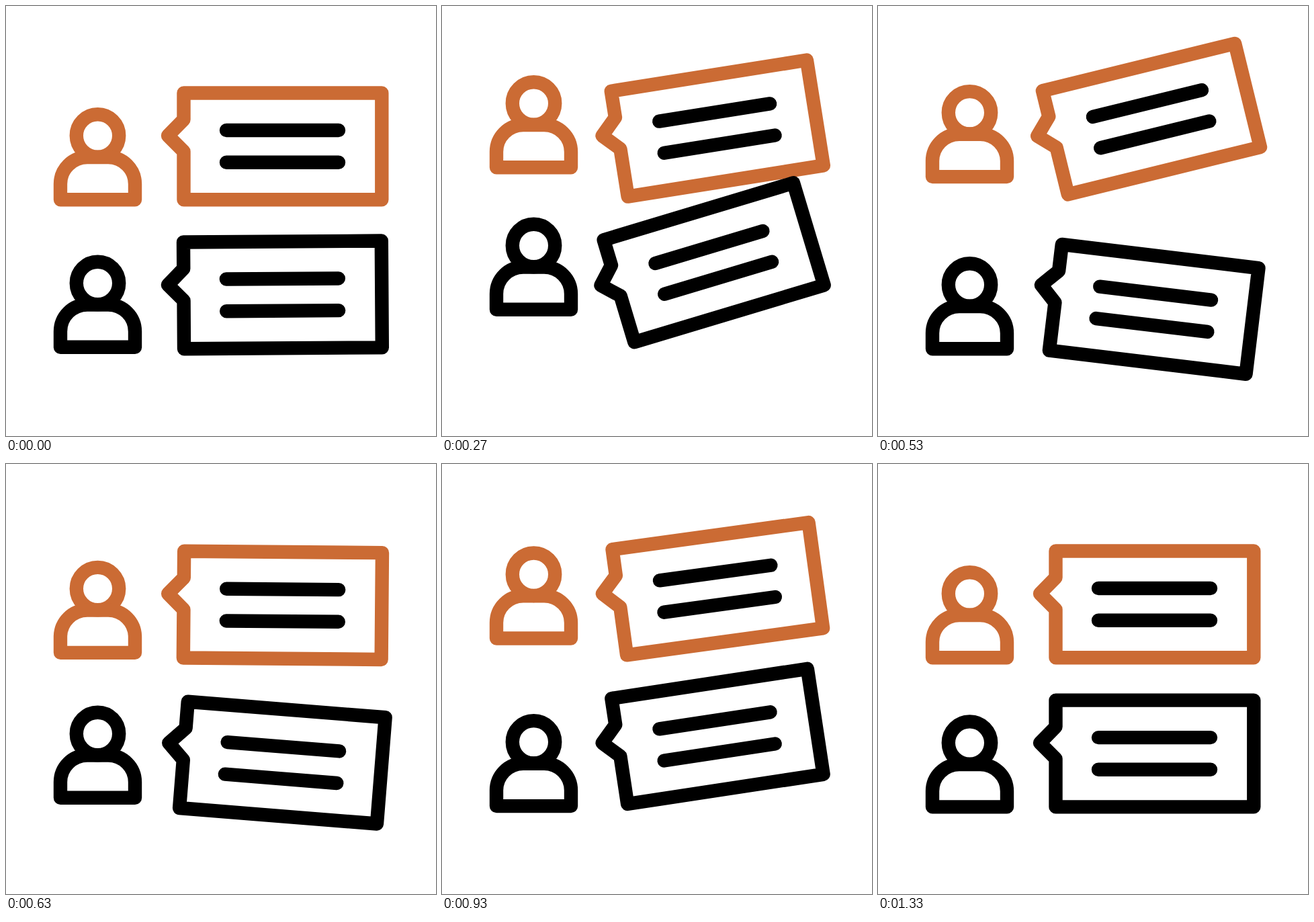
Animation of 640 by 640 pixels, one loop 1.67 s. Source, as an HTML page:

```html
<!DOCTYPE html>
<html lang="en">
<head>
<meta charset="utf-8">
<title>Chat</title>
<style>
  html, body { margin: 0; width: 100%; height: 100%; overflow: hidden; background: #fff; }
  svg { display: block; width: 100%; height: 100%; }
  .chat { fill: none; stroke: currentColor; stroke-width: 20.4; stroke-linecap: round; stroke-linejoin: round; }
  .lines { stroke: #000; }
</style>
</head>
<body>
<svg viewBox="0 0 640 640">
  <defs>
    <g id="person">
      <circle cx="136.5" cy="193" r="31.7"/>
      <path d="M81 288.3V265a40 40 0 0 1 40-40h31a40 40 0 0 1 40 40v23.3z"/>
    </g>
    <g id="bubble">
      <path d="M264.5 129.5H559.3V288.3H264.5V216.5L241 193L264.5 169z"/>
      <path class="lines" d="M328 185H495M328 232.7H495"/>
    </g>
  </defs>
  <g class="chat" color="#cb6b34">
    <use href="#person"/>
    <use href="#bubble"/>
  </g>
  <g class="chat" color="#000" transform="translate(0 222.1)">
    <use href="#person"/>
    <use href="#bubble"/>
  </g>
</svg>
<script>
  const LOOP = 1670;
  const PIVOT = '241 208.9';
  const STARTS = [132, -28];

  // Eases with flat ends; a smaller x2 gives a longer tail.
  const ease = x2 => x => {
    let lo = 0, hi = 1;
    for (let i = 0; i < 30; i++) {
      const s = (lo + hi) / 2, r = 1 - s;
      if (s * r * r + 3 * x2 * s * s * r + s * s * s < x) lo = s; else hi = s;
    }
    return lo * lo * (3 - 2 * lo);
  };
  const even = ease(2 / 3), settle = ease(0.36);

  // [time, value, ease into this key]
  const LIFT = [[0, 0], [250, -62.5, settle], [566, 0, even], [765, -30.7, even], [1010, 0, settle]];
  const TILT = [[0, 0], [344, -17, settle], [583, 7.6, even], [878, -11.2, even], [1198, 0, settle]];

  function valueAt(keys, t) {
    if (t <= 0) return keys[0][1];
    for (let i = 1; i < keys.length; i++) {
      const [t0, v0] = keys[i - 1], [t1, v1, fn] = keys[i];
      if (t < t1) return v0 + (v1 - v0) * fn((t - t0) / (t1 - t0));
    }
    return keys[keys.length - 1][1];
  }

  // Holds each pose for one 30 fps step, on a 10 ms clock.
  function stepTime(t) {
    const step = Math.floor((Math.floor(t / 10) * 10 + 4) * 0.03);
    return Math.round(step * 10 / 3) * 10;
  }

  const chats = [...document.querySelectorAll('.chat')].map(g => g.children);

  function draw(time) {
    const t = stepTime(time % LOOP);
    chats.forEach(([person, bubble], i) => {
      const local = t - STARTS[i];
      person.setAttribute('transform', `translate(0 ${valueAt(LIFT, local)})`);
      bubble.setAttribute('transform', `rotate(${valueAt(TILT, local)} ${PIVOT})`);
    });
  }

  const begin = performance.now();
  function tick() {
    draw(Math.max(0, performance.now() - begin));
    requestAnimationFrame(tick);
  }
  tick();
</script>
</body>
</html>
```
